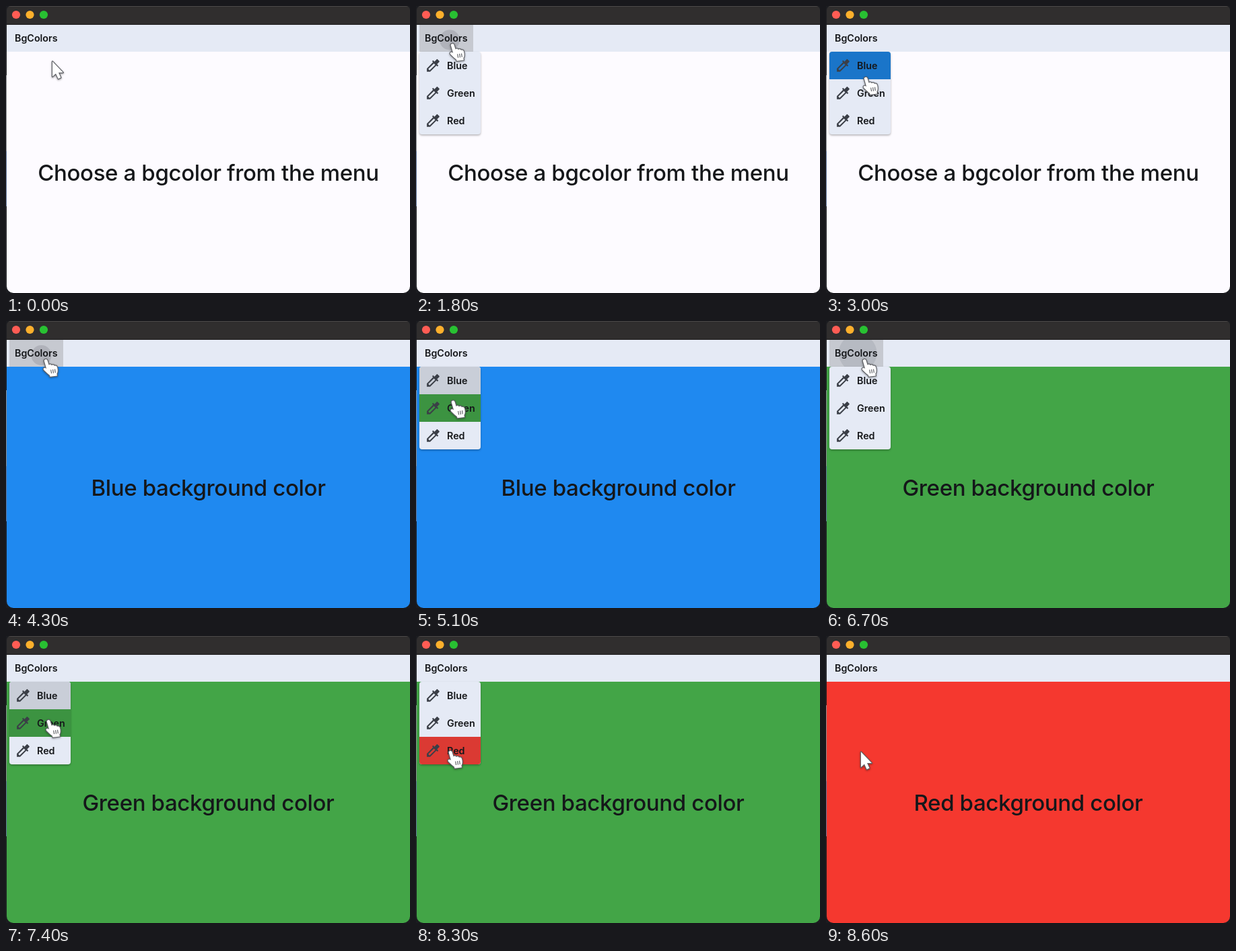
Animation, 600 px wide and 427 px high, one loop 8700 ms. Source, as an HTML page with a canvas:

```html
<!DOCTYPE html>
<html lang="en">
<head>
<meta charset="utf-8">
<title>BgColors</title>
<style>
html, body { margin: 0; width: 100%; height: 100%; overflow: hidden; background: #1b1c20; }
canvas { display: block; }
</style>
</head>
<body>
<canvas id="stage" width="600" height="427"></canvas>
<script>
const ctx = document.getElementById('stage').getContext('2d');
const LOOP = 8700, STEP = 100;
const FONT = 'Inter, "Open Sans", sans-serif';
const INK = '#15171a', BAR = '#e5eaf5';

const rows = [
  { name: 'Blue', hover: '#1a75c9' },
  { name: 'Green', hover: '#3c9341' },
  { name: 'Red', hover: '#db3a33' }
];
const pages = [
  { from: 0, color: '#fdfbff', text: 'Choose a bgcolor from the menu' },
  { from: 3200, color: '#1f89f0', text: 'Blue background color' },
  { from: 5600, color: '#43a547', text: 'Green background color' },
  { from: 8400, color: '#f5382f', text: 'Red background color' }
];
const presses = [1800, 4300, 6600];
const menuSpans = [[1800, 3200], [4400, 5600], [6600, 8400]];

// Pointer hotspot: time, x, y
const track = [
  [0, 69, 82], [300, 95, 84], [600, 80, 72], [900, 58, 61], [1200, 55, 57],
  [2000, 55, 57], [2600, 57, 102], [3000, 60, 107], [3400, 60, 107],
  [4000, 60, 61], [4300, 60, 58], [4500, 60, 58], [4900, 58, 104],
  [5300, 54, 135], [5800, 54, 135], [6400, 58, 58], [6800, 58, 58],
  [7300, 63, 107], [7400, 64, 126], [7600, 64, 130], [8200, 52, 172], [LOOP, 52, 172]
];

const dropper = new Path2D('M20.71 5.63l-2.34-2.34c-.39-.39-1.02-.39-1.41 0l-3.12 3.12-1.93-1.91-1.41 1.41 1.42 1.42L3 16.25V21h4.75l8.92-8.92 1.42 1.42 1.41-1.41-1.92-1.92 3.12-3.12c.4-.4.4-1.03.01-1.42zM6.92 19L5 17.08l8.06-8.06 1.92 1.92z');
const arrow = new Path2D('M0 .5V23L5 18.5L8.6 26.3L12.4 24.6L9 17H15.8Z');
const hand = new Path2D('M-3.2 1.6C-3.6-1.2 .6-2 1.6 .9L3.6 7.6C4.8 5.8 7.2 6.2 7.7 8C9 6.6 11.4 7 11.9 8.9C13.4 7.8 15.4 8.6 15.9 10.6C17.2 15 17 18 15.4 20.6L15.9 23.4L5.6 24.8L4.8 22.4C1.6 20.6-.6 17.6-3.6 15C-5.6 12.8-2.8 10.6-.4 12.6L.2 13.2Z');
const fingers = new Path2D('M6.6 14.5L7.6 20M9.6 14L10.5 19.6M12.5 13.6L13.3 19');

const lerp = (a, b, k) => a + (b - a) * k;

function pointer(t) {
  const i = Math.max(1, track.findIndex(p => p[0] > t));
  const [a, b] = [track[i - 1], track[i]];
  const k = (t - a[0]) / (b[0] - a[0]);
  const e = k * k * (3 - 2 * k);
  return { x: lerp(a[1], b[1], e), y: lerp(a[2], b[2], e) };
}

const menuOpen = t => menuSpans.some(([a, b]) => t >= a && t < b);

function hoveredRow(t) {
  const { x, y } = pointer(t);
  if (!menuOpen(t) || x < 5 || x > 96 || y < 68 || y > 191) return -1;
  return Math.floor((y - 68) / 41);
}

function onButton(t) {
  const { x, y } = pointer(t);
  return x >= 5 && x <= 85 && y >= 28 && y < 68;
}

function rect(x, y, w, h, color, r = 0) {
  ctx.fillStyle = color;
  ctx.beginPath();
  ctx.roundRect(x, y, w, h, r);
  ctx.fill();
}

function disc(x, y, r, color) {
  ctx.fillStyle = color;
  ctx.beginPath();
  ctx.arc(x, y, r, 0, 7);
  ctx.fill();
}

function text(str, x, y, font, spacing, align) {
  ctx.font = `${font} ${FONT}`;
  ctx.letterSpacing = spacing;
  ctx.textAlign = align;
  ctx.fillStyle = INK;
  ctx.fillText(str, x, y);
}

const label = (str, x, y) => text(str, x, y, '600 14.3px', '0px', 'left');
const heading = str => text(str, 300.5, 260, '450 33px', '-0.36px', 'center');

function shadow(blur, dy, alpha) {
  ctx.shadowColor = `rgba(0,0,0,${alpha})`;
  ctx.shadowBlur = blur;
  ctx.shadowOffsetY = dy;
}

function drawDesktop() {
  rect(0, 0, 600, 427, '#1b1c20');
  rect(0, 103, 1, 113, '#85878c');
  rect(0, 216, 1, 82, '#5b6f95');
}

function drawWindow(color) {
  ctx.save();
  ctx.beginPath();
  ctx.roundRect(1, 0, 599, 427, [6, 6, 10, 10]);
  ctx.clip();
  rect(1, 0, 599, 28, '#302e2e');
  rect(1, 0, 599, 1, '#4a4848');
  rect(1, 27, 599, 1, '#1c1b1b');
  rect(1, 28, 599, 40, BAR);
  rect(1, 68, 599, 359, color);
  ['#ff5c54', '#fdb02c', '#28c132'].forEach((c, i) => disc(15 + 20.5 * i, 13, 6.1, c));
  ctx.restore();
}

function drawButton(t) {
  const press = presses.find(p => t >= p && t < p + 300);
  if (onButton(t)) rect(5, 28, 80, 40, press === undefined ? '#d3d7e1' : '#c6c9d0');
  if (press !== undefined) {
    const k = (t - press) / 300;
    const p = pointer(press);
    ctx.save();
    ctx.beginPath();
    ctx.rect(5, 28, 80, 40);
    ctx.clip();
    const pull = Math.min(1, 0.5 + k);
    disc(lerp(p.x, 45, pull), lerp(p.y, 48, pull) - 2, 15 + 40 * k, `rgba(40,44,54,${0.14 * (1 - k)})`);
    ctx.restore();
  }
  label('BgColors', 13, 53);
}

function drawMenu(t) {
  ctx.save();
  shadow(3, 1.5, 0.3);
  rect(5, 68, 91, 123, BAR, 4);
  ctx.restore();
  const now = hoveredRow(t), before = hoveredRow(t - STEP);
  rows.forEach((row, i) => {
    const y = 68 + 41 * i;
    const top = i === 0 ? 4 : 0, bottom = i === 2 ? 4 : 0;
    const corners = [top, top, bottom, bottom];
    if (i === now) rect(5, y, 91, 41, row.hover, corners);
    else if (i === before) rect(5, y, 91, 41, '#c9ced8', corners);
    ctx.save();
    ctx.translate(13, y + 8);
    ctx.scale(1.04, 1.04);
    ctx.fillStyle = '#3b3f47';
    ctx.fill(dropper, 'evenodd');
    ctx.restore();
    label(row.name, 46, y + 26);
  });
}

function drawPointer(t) {
  const { x, y } = pointer(t);
  const pointing = onButton(t) || hoveredRow(t) >= 0;
  const shape = pointing ? hand : arrow;
  ctx.save();
  ctx.translate(x, y);
  ctx.lineJoin = 'round';
  ctx.lineWidth = 2.4;
  ctx.strokeStyle = '#606267';
  shadow(3, 1, 0.4);
  ctx.stroke(shape);
  ctx.shadowColor = 'transparent';
  ctx.fillStyle = '#fff';
  ctx.fill(shape);
  if (pointing) {
    ctx.lineWidth = 1.2;
    ctx.stroke(fingers);
  }
  ctx.restore();
}

function draw(t) {
  const page = pages.findLast(p => t >= p.from);
  drawDesktop();
  drawWindow(page.color);
  drawButton(t);
  heading(page.text);
  if (menuOpen(t)) drawMenu(t);
  drawPointer(t);
}

function tick(now) {
  draw(Math.floor((now % LOOP) / STEP) * STEP);
  requestAnimationFrame(tick);
}
requestAnimationFrame(tick);
</script>
</body>
</html>
```
